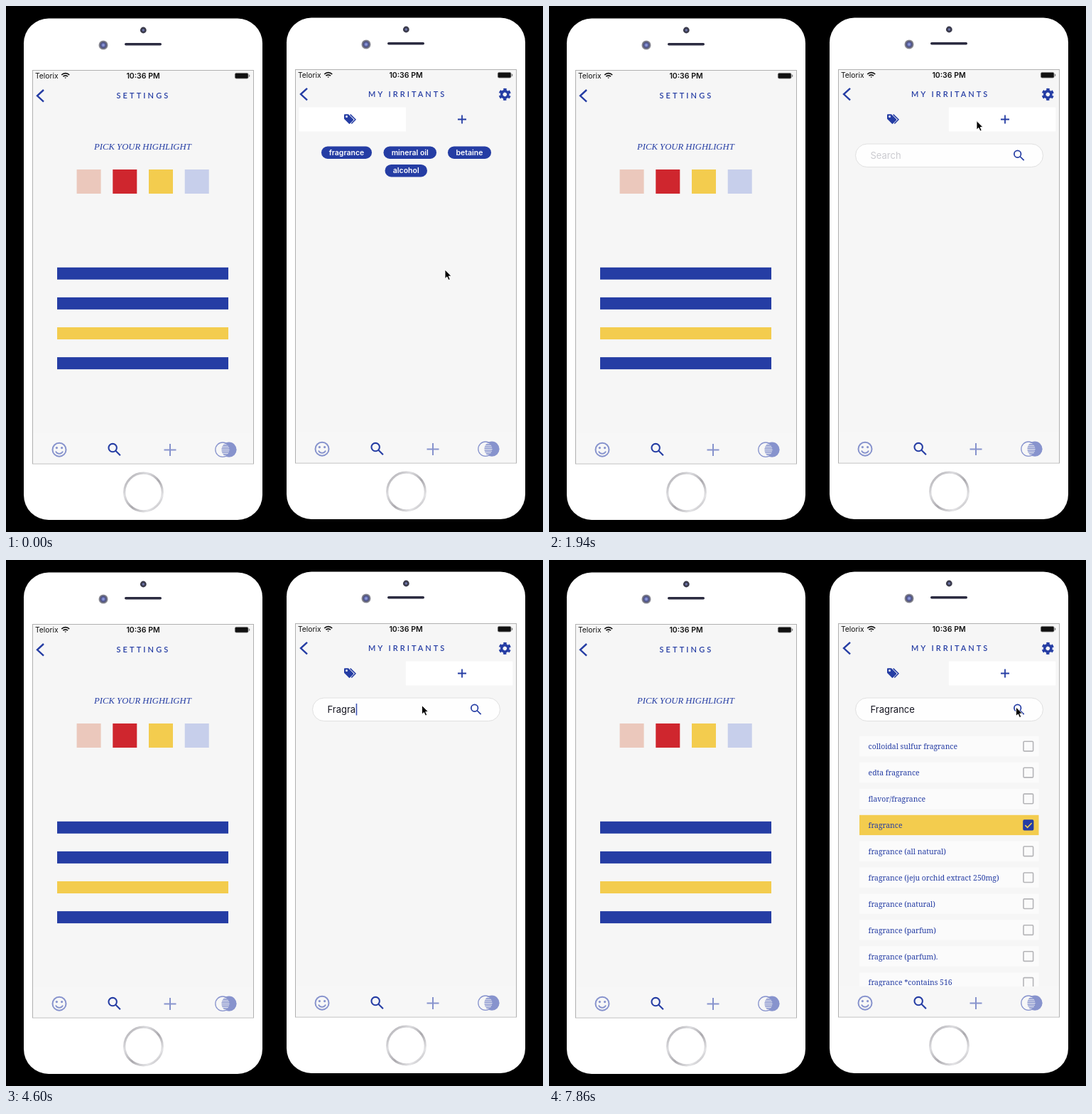
Recreate the animation shown at these times as an HTML page. Size 756 by 740 pixels, loop 8000 ms.

```html
<!DOCTYPE html>
<html lang="en">
<head>
<meta charset="utf-8">
<title>Irritants app demo</title>
<style>
  html, body { margin: 0; width: 100%; height: 100%; overflow: hidden; background: #000; }
  svg { display: block; }
  text { font-family: Inter, "Liberation Sans", sans-serif; }
  .title { font: 600 11px Lato, sans-serif; letter-spacing: 3.1px; fill: #253da4; }
  .pick { font: italic 12.7px "Liberation Serif", serif; fill: #253da4; }
  .chip { font-size: 10.5px; font-weight: 600; fill: #fff; text-anchor: middle; }
  .item { font: 10.4px "Noto Serif", serif; fill: #253da4; }
  .line { fill: none; stroke: #253da4; stroke-width: 2; }
  .soft { fill: none; stroke: #8793cd; stroke-width: 2; }
</style>
</head>
<body>
<svg width="756" height="740" viewBox="0 0 756 740">
  <defs>
    <linearGradient id="metal" x2="1" y2="1">
      <stop offset="0" stop-color="#a3a1a6"/>
      <stop offset=".3" stop-color="#dddde0"/>
      <stop offset=".55" stop-color="#aaa8ad"/>
      <stop offset=".8" stop-color="#e4e4e6"/>
      <stop offset="1" stop-color="#a5a3a8"/>
    </linearGradient>
    <radialGradient id="lens">
      <stop offset=".1" stop-color="#8f9ce0"/>
      <stop offset=".55" stop-color="#4a4f86"/>
      <stop offset=".75" stop-color="#70707c"/>
      <stop offset="1" stop-color="#a4a4ac"/>
    </radialGradient>
    <pattern id="stripes" width="4" height="2.6" patternUnits="userSpaceOnUse">
      <rect width="4" height="1" fill="#f6f6f6"/>
    </pattern>
    <clipPath id="listArea"><rect x="407" y="230" width="312" height="370"/></clipPath>
    <g id="glass" class="line">
      <circle cx="9.5" cy="9.5" r="5.5"/>
      <path d="M13.5 13.5L19.8 19.8"/>
    </g>
    <path id="back" class="line" style="stroke-width:2.4" d="M53 118L44 126.3L53 134.6"/>

    <g id="phone">
      <rect x="25" y="17.5" width="336" height="705.5" rx="35" fill="#fff"/>
      <circle cx="193.3" cy="34" r="4.4" fill="#3b3b4c"/>
      <circle cx="193.3" cy="34" r="1.8" fill="#6d74a8"/>
      <circle cx="137" cy="55" r="6.6" fill="url(#lens)"/>
      <rect x="167" y="52" width="52" height="3.4" rx="1.7" fill="#2b2b40"/>
      <circle cx="193.5" cy="684" r="26.8" fill="#fff" stroke="url(#metal)" stroke-width="3.2"/>
      <rect x="37.5" y="90.5" width="311" height="553.5" fill="#f6f6f6" stroke="#b0b0b0"/>
      <rect x="38" y="601" width="310" height="42.5" fill="#f7f7f7"/>

      <text x="41" y="101.6" font-size="10.3" fill="#111">Telorix</text>
      <g fill="none" stroke="#111" stroke-width="1.7">
        <path d="M78.2 97A7.6 7.6 0 0 1 89.2 97M80.4 99.2A4.6 4.6 0 0 1 87 99.2"/>
        <path d="M82.3 100.6h2.8l-1.4 1.5z" fill="#111" stroke="none"/>
      </g>
      <text x="193" y="101.6" font-size="10.5" font-weight="600" text-anchor="middle" fill="#111">10:36 PM</text>
      <rect x="322.4" y="94.4" width="18.6" height="7.6" rx="1.8" fill="#111" stroke="#777" stroke-width=".8"/>
      <rect x="342" y="96.6" width="1.2" height="3.2" rx=".6" fill="#777"/>

      <g class="soft">
        <circle cx="75" cy="624.2" r="9.5"/>
        <path d="M70 626.5a5.4 5.4 0 0 0 10 0" stroke-width="1.9"/>
        <path d="M231 616v17M222.5 624.5h17"/>
      </g>
      <circle cx="71.4" cy="621.6" r="1.6" fill="#8793cd"/>
      <circle cx="78.6" cy="621.6" r="1.6" fill="#8793cd"/>
      <use href="#glass" transform="translate(140.3 611.7) scale(1.04)"/>
      <circle cx="314" cy="624.2" r="10.6" fill="#8793cd"/>
      <circle cx="305" cy="624.2" r="10.2" fill="url(#stripes)" stroke="#8793cd" stroke-width="1.3"/>
    </g>
  </defs>

  <rect width="756" height="740"/>
  <use href="#phone"/>
  <use href="#back"/>
  <text class="title" x="155.5" y="130.4">SETTINGS</text>
  <text class="pick" x="124" y="202.3">PICK YOUR HIGHLIGHT</text>
  <g id="palette"></g>

  <use href="#phone" x="370" y="-1"/>
  <use href="#back" x="371" y="-2.2"/>
  <text class="title" x="510" y="128.4" style="letter-spacing:3px">MY IRRITANTS</text>
  <g fill="none" stroke="#253da4" transform="translate(702.3 124.3) rotate(30)">
    <circle r="4.6" stroke-width="3.7"/>
    <circle r="7.2" stroke-width="2.8" stroke-dasharray="4.2 3.34" stroke-dashoffset="2.1"/>
  </g>
  <rect id="tab" y="142.5" width="150.5" height="34" fill="#fff"/>
  <path fill="#253da4" fill-rule="evenodd" d="M476 153.2q0-1 1-1h5l7 7.1q.7.8 0 1.5l-4.8 4.8q-.8.7-1.5 0l-6.7-6.8zM478 155.5a1.5 1.5 0 1 0 3 0a1.5 1.5 0 1 0 -3 0z"/>
  <path class="line" style="stroke-width:1.5" d="M484.6 152.6l7.3 7.2-5.6 5.7"/>
  <path class="line" style="stroke-width:1.8" d="M642 153.5v12M636 159.5h12"/>

  <g id="chips"></g>

  <g id="find">
    <rect x="431.5" y="194" width="264" height="32.6" rx="16.3" fill="#fefefe" stroke="#e0e0e0"/>
    <text id="query" x="452.5" y="214.7" font-size="13"></text>
    <rect id="caret" y="202" width="1.6" height="16.5" fill="#4056b4"/>
    <use id="go" href="#glass" transform="translate(651.4 200) scale(.87)"/>
  </g>
  <g id="spinner" transform="translate(562 257.5)"></g>
  <g id="list" clip-path="url(#listArea)"></g>

  <path id="cursor" d="M0 0V12.6L2.9 9.9L5 14.6L7.2 13.6L5.2 9.1H9z" stroke="#fff" stroke-width=".9"/>
</svg>
<script>
const $ = id => document.getElementById(id);
const LOOP = 8000, TICK = 148;
const BLUE = '#253da4', YELLOW = '#f3cc4e';
const box = (x, y, w, h, fill, more = '') =>
  `<rect x="${x}" y="${y}" width="${w}" height="${h}" fill="${fill}" ${more}/>`;

$('palette').innerHTML =
  ['#ebc8bc', '#cf262e', YELLOW, '#c7cfeb'].map((c, i) => box(99.6 + i * 50.7, 230, 34, 34, c)).join('') +
  [BLUE, BLUE, YELLOW, BLUE].map((c, i) => box(72, 367.8 + i * 42.1, 241, 17, c)).join('');

$('chips').innerHTML = [
  ['fragrance', 444, 197.5, 71], ['mineral oil', 531.5, 197.5, 74.5],
  ['betaine', 622, 197.5, 61], ['alcohol', 533.5, 223, 59.5]
].map(([word, x, y, w]) => box(x, y, w, 17.4, BLUE, 'rx="8.7"') +
  `<text class="chip" x="${x + w / 2}" y="${y + 12.3}">${word}</text>`).join('');

$('spinner').innerHTML = Array.from({ length: 12 }, (_, i) => {
  const age = (i + 6) % 12, grey = 145 + Math.min(age, 8) * 9.5;
  return box(-1.2, -14.3, 2.4, 7.6, `rgb(${grey},${grey},${grey})`, `rx="1.2" transform="rotate(${i * 30})"`);
}).join('');

$('list').innerHTML = [
  'colloidal sulfur fragrance', 'edta fragrance', 'flavor/fragrance', 'fragrance',
  'fragrance (all natural)', 'fragrance (jeju orchid extract 250mg)', 'fragrance (natural)',
  'fragrance (parfum)', 'fragrance (parfum).', 'fragrance *contains 516'
].map((name, i) => {
  const y = 248 + i * 36.93, on = name === 'fragrance';
  return box(437, y, 252.5, 28.3, on ? YELLOW : '#fbfbfb') +
    `<text class="item" x="449.6" y="${y + 18.1}">${name}</text>` +
    box(668, y + 7.3, 13.6, 13.6, on ? BLUE : 'none', `rx="1.2" stroke="${on ? BLUE : '#b5b5b8'}" stroke-width="1.6"`) +
    (on ? `<path d="M670.3 ${y + 14.3}l3.3 3.3 6-6.4" fill="none" stroke="${YELLOW}" stroke-width="1.6"/>` : '');
}).join('');

// Pointer moves: start time, number of steps, end point, easing
const smooth = p => p * p * (3 - 2 * p);
const moves = [
  [750, 7, 602, 161.5, smooth],
  [2090, 4, 585.5, 204.5, smooth],
  [5790, 6, 657.5, 207, p => 1 - (1 - p) ** 4]
];
function pointer(t) {
  let x = 618, y = 371;
  for (const [start, steps, endX, endY, ease] of moves) {
    if (t < start) break;
    const k = ease(Math.min(1, (Math.floor((t - start + 6) / TICK) + 1) / steps));
    x += (endX - x) * k;
    y += (endY - y) * k;
  }
  return [x, y];
}

const keys = [3570, 3720, 4010, 4160, 4310, 4600, 4900, 5350, 5640];
const show = (id, on) => $(id).setAttribute('visibility', on ? 'visible' : 'hidden');

function draw(t) {
  const adding = t >= 1940, loading = t >= 7710 && t < 7860;
  $('tab').setAttribute('x', adding ? 562.8 : 412.5);
  show('chips', !adding);
  show('find', adding);
  show('spinner', loading);
  show('list', t >= 7860);

  const typed = 'Fragrance'.slice(0, keys.filter(k => t >= k).length);
  const query = $('query');
  query.textContent = typed || 'Search';
  query.setAttribute('fill', typed ? '#151520' : '#cbcbd0');
  $('caret').setAttribute('x', 453 + (typed ? query.getComputedTextLength() : 0));
  show('caret', t >= 2830 && t < 7710);
  $('go').setAttribute('opacity', loading ? .7 : 1);

  $('cursor').setAttribute('transform', `translate(${pointer(t)})`);
}

function frame(now) {
  draw(now % LOOP);
  requestAnimationFrame(frame);
}
draw(0);
requestAnimationFrame(frame);
</script>
</body>
</html>
```
